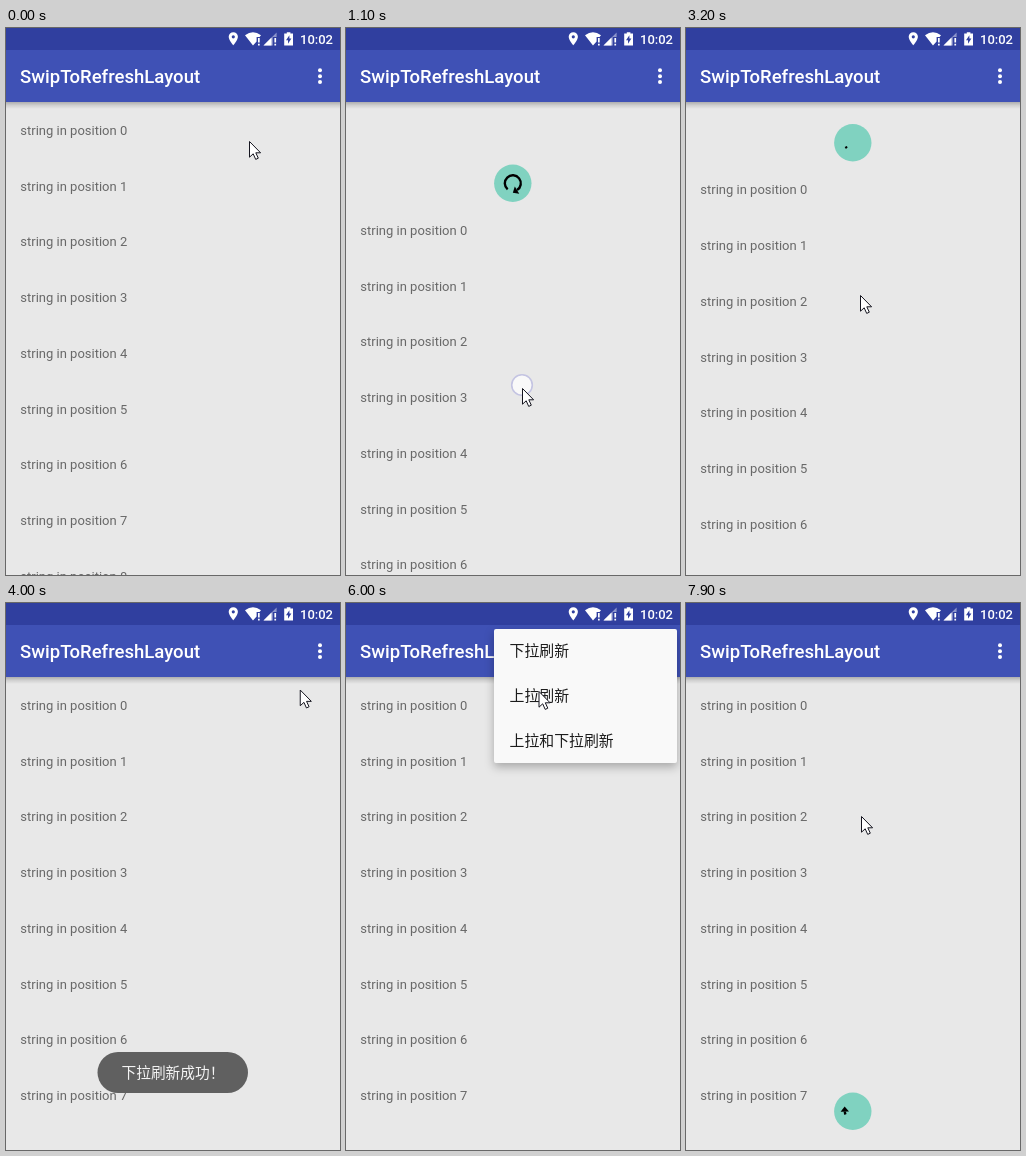
An HTML page that plays this animation: 334x547 px, repeating every 8000 ms.

```html
<!DOCTYPE html>
<html lang="zh">
<head>
<meta charset="utf-8">
<title>Pull to refresh</title>
<style>
  html, body { margin: 0; width: 100%; height: 100%; overflow: hidden; background: #e8e8e8; }
  svg { display: block; width: 334px; height: 547px; }
  text { font-family: Roboto, sans-serif; }
  .row { font-size: 13px; fill: #686868; }
  .title { font-size: 18.55px; font-weight: 500; fill: #fff; }
  .clock { font-size: 13px; font-weight: 500; fill: #fff; }
  #menu text { font: 500 14.9px "Noto Sans CJK SC", "Noto Sans CJK", sans-serif; fill: #1c1c1c; }
  #toast text { font: 14.7px "Noto Sans CJK TC", "Noto Sans CJK", sans-serif; fill: #f4f4f4; }
  #menu rect { filter: drop-shadow(0 4px 5px rgba(0, 0, 0, .28)); }
</style>
</head>
<body>
<svg viewBox="0 0 334 547">
  <defs>
    <linearGradient id="shade" x2="0" y2="1">
      <stop offset="0" stop-opacity=".25"/>
      <stop offset=".5" stop-opacity=".1"/>
      <stop offset="1" stop-opacity="0"/>
    </linearGradient>
  </defs>
  <rect width="334" height="547" fill="#e8e8e8"/>
  <g id="list"></g>
  <g id="badge">
    <circle r="18.7" fill="#80d2c0"/>
    <path id="arc" fill="none" stroke="#000" stroke-width="2.4"/>
    <path id="head" d="M-4.2 0H4.2L0 5Z"/>
  </g>

  <rect y="74" width="334" height="7" fill="url(#shade)"/>
  <rect width="334" height="74" fill="#3f51b5"/>
  <rect width="334" height="22" fill="#303f9f"/>
  <text class="title" x="14" y="55.4">SwipToRefreshLayout</text>
  <g fill="#fff">
    <circle cx="314" cy="42.3" r="2"/>
    <circle cx="314" cy="48.2" r="2"/>
    <circle cx="314" cy="54.1" r="2"/>
    <path fill-rule="evenodd" d="M227.3 4.2a4.6 4.6 0 0 0-4.6 4.6c0 3.4 4.6 8.6 4.6 8.6s4.6-5.2 4.6-8.6a4.6 4.6 0 0 0-4.6-4.6zm0 3a1.6 1.6 0 0 1 0 3.2a1.6 1.6 0 0 1 0-3.2z"/>
    <path d="M239 7.2Q247 1.5 255 7.2L253.6 9H250.6V13.4L247 17.4Z"/>
    <path d="M252 10h1.7v4.6H252zM252 15.7h1.7v1.7H252z"/>
    <path d="M257.5 17.4L270.6 4.4V9H266.8V17.4Z" opacity=".45"/>
    <path d="M257.5 17.4L265.5 9.5V17.4Z"/>
    <path d="M268.4 10h1.7v4.6h-1.7zM268.4 15.7h1.7v1.7h-1.7z"/>
    <path fill-rule="evenodd" d="M278.2 5.6h2.6V4.2h3.6v1.4h2.6V17.4h-8.8zM283.4 7.2l-3.4 5h2v3.6l3.4-5.2h-2z"/>
  </g>
  <text class="clock" x="294" y="16">10:02</text>

  <g id="toast">
    <rect x="91.5" y="449" width="150.5" height="41" rx="20.5" fill="#606060"/>
    <text x="115.5" y="475">下拉刷新成功！</text>
  </g>
  <g id="menu">
    <rect x="148" y="26" width="183" height="134" rx="2" fill="#f9f9f9"/>
    <text x="163.5" y="53.4">下拉刷新</text>
    <text x="163.5" y="98.2">上拉刷新</text>
    <text x="163.5" y="142.8">上拉和下拉刷新</text>
  </g>

  <g id="pointer">
    <circle id="touch" cy="-3" r="10.3" fill="#fff" fill-opacity=".75" stroke="#c4c4e2" stroke-width="1.6"/>
    <path d="M.5 .5V16.2L4.2 12.8L6.7 18.4L9.3 17.2L6.8 11.8H11.6Z" fill="#fff" stroke="#15151f"/>
  </g>
</svg>
<script>
const LOOP = 8000, STEP = 100, ROW = 55.75, ROWS = 9, RING = 8;
const REST = 59.5, PULL = 100, ARC = 288, SPIN = 1333;
const $ = id => document.getElementById(id);
const set = (id, name, value) => $(id).setAttribute(name, value);
const show = (id, on) => set(id, 'visibility', on ? 'visible' : 'hidden');
const mix = (a, b, k) => a + (b - a) * k;
const ramp = (t, from, to) => Math.min(1, Math.max(0, (t - from) / (to - from)));
const ease = k => k * k * (3 - 2 * k);
const easeOut = k => 1 - (1 - k) ** 3;

// Each glide of the pointer eases out towards its stop.
const glides = [
  { from: 0, to: 400, x: 176, y: 160 },
  { from: 400, to: 1100, x: 176, y: 360 },
  { from: 1200, to: 2700, x: 174, y: 267 },
  { from: 3700, to: 4370, x: 318, y: 50 },
  { from: 4500, to: 4700, x: 301, y: 56 },
  { from: 4700, to: 6000, x: 192.5, y: 88 },
  { from: 6400, to: 6700, x: 190, y: 445 },
  { from: 6900, to: 7700, x: 175, y: 213 }
];

function pointer(t) {
  return glides.reduce((p, g) => {
    const k = easeOut(ramp(t, g.from, g.to));
    return { x: mix(p.x, g.x, k), y: mix(p.y, g.y, k) };
  }, { x: 243, y: 113 });
}

function pressed(t) {
  const within = (from, to) => t >= from && t < to;
  const drag = within(400, 1200) || within(6900, 7500);
  const click = within(4400, 4500) || within(6300, 6400);
  return drag || click;
}

// Angles in degrees, clockwise from the right.
function topSpinner(t, pull) {
  const k = ramp(t, 1200, 1867);
  if (k < 1) {
    const drag = (Math.max(pull, t > 1200 ? PULL : 0) - PULL) * 2.6;
    return { end: mix(58 + drag, 368, k), sweep: mix(ARC, 14, ease(k)), size: 1 - k };
  }
  const turns = (t - 1867) / SPIN, part = turns % 1;
  const grow = ease(ramp(part, 0, .5)), trim = ease(ramp(part, .5, 1));
  return {
    end: 8 + 504 * Math.floor(turns) + 216 * part + ARC * grow,
    sweep: 14 + ARC * (grow - trim),
    size: 0
  };
}

function bottomSpinner(t) {
  return {
    end: mix(60, 178, ramp(t, 7000, 7600)),
    sweep: mix(ARC, 22, ease(ramp(t, 7550, 7900))),
    size: 1
  };
}

function drawSpinner({ end, sweep, size }) {
  const at = deg => {
    const r = deg * Math.PI / 180;
    return `${RING * Math.cos(r)} ${RING * Math.sin(r)}`;
  };
  set('arc', 'd', `M${at(end - sweep)}A${RING} ${RING} 0 ${sweep > 180 ? 1 : 0} 1 ${at(end)}`);
  set('head', 'transform', `rotate(${end}) translate(${RING}) scale(${size})`);
}

function draw(t) {
  const pull = PULL * easeOut(ramp(t, 400, 1100))
    - (PULL - REST) * ramp(t, 1200, 1500) - REST * ramp(t, 3300, 3500);
  set('list', 'transform', `translate(0 ${pull})`);
  show('row8', t < 1000);

  const low = t >= 7000;
  const size = 1 - ramp(t, 3300, 3400) + ramp(t, 7100, 7400);
  const y = low ? 508.3 : 55.3 + (t < 3300 ? pull : REST);
  set('badge', 'transform', `translate(166.8 ${y}) scale(${size})`);
  show('badge', size > 0);
  drawSpinner(low ? bottomSpinner(t) : topSpinner(t, pull));

  set('toast', 'opacity', ramp(t, 3300, 3600) - ramp(t, 5300, 5700));
  set('menu', 'opacity', ramp(t, 4500, 4700) - ramp(t, 6400, 6600));

  const p = pointer(t);
  set('pointer', 'transform', `translate(${p.x} ${p.y})`);
  show('touch', pressed(t));
}

$('list').innerHTML = Array.from({ length: ROWS }, (_, i) =>
  `<text id="row${i}" class="row" x="14.3" y="${106.9 + i * ROW}">string in position ${i}</text>`).join('');

const start = performance.now();
function tick() {
  const t = (performance.now() - start) % LOOP;
  draw(Math.floor(t / STEP) * STEP);
  requestAnimationFrame(tick);
}
tick();
</script>
</body>
</html>
```
